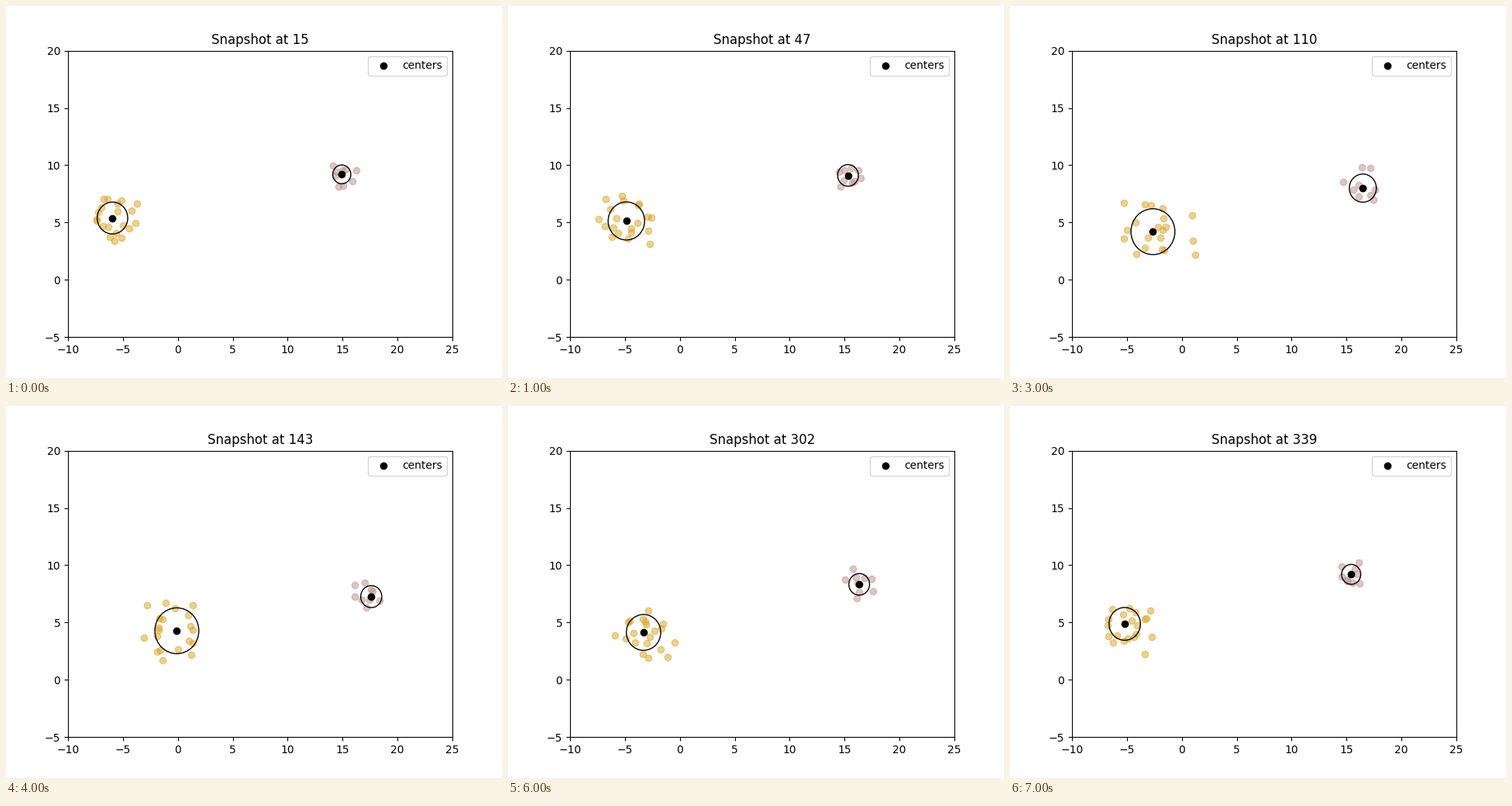
These frames come from a looping animation (640x480 px, 8 s). A matplotlib script:

```python
import numpy as np
import matplotlib.pyplot as plt
from matplotlib.animation import FuncAnimation
from matplotlib.patches import Circle

STEPS = [15, 47, 80, 110, 143, 262, 302, 339]
LIFE = 58  # steps a point stays in the sliding window
GOLDEN_ANGLE = np.pi * (3 - np.sqrt(5))

# Key points of each cluster's path: step -> x, y, radius.
GOLD_PATH = {15: (-5.95, 5.39, 1.39), 80: (-3.75, 4.87, 1.94), 110: (-2.63, 4.20, 2.0),
             143: (-0.09, 4.28, 2.0), 262: (-1.25, 3.33, 1.71), 339: (-5.20, 4.88, 1.43)}
PINK_PATH = {15: (14.93, 9.20, 0.82), 80: (15.71, 9.02, 1.07), 110: (16.48, 8.0, 1.23),
             143: (17.61, 7.26, 0.96), 262: (17.32, 7.39, 1.02), 339: (15.42, 9.20, 0.87)}


class Cloud:
    """A drifting cluster: points are born at a steady rate and drop out after LIFE steps."""

    def __init__(self, ax, color, path, count, seed):
        self.keys = list(path)
        self.values = np.array(list(path.values())).T
        self.dots = ax.scatter([], [], color=color, alpha=0.5)
        self.ring = ax.add_patch(Circle((0, 0), 1, fill=False))

        self.births = np.arange(STEPS[0] - LIFE, STEPS[-1] + 1, LIFE / count)
        x, y, radius = self.state(self.births + LIFE / 2)
        n = len(self.births)
        reach = radius * np.random.default_rng(seed).uniform(0.45, 1.45, n)
        angle = GOLDEN_ANGLE * np.arange(n)
        self.points = np.column_stack([x + reach * np.cos(angle),
                                       y + reach * np.sin(angle)])

    def state(self, step):
        return [np.interp(step, self.keys, v) for v in self.values]

    def show(self, step):
        alive = (self.births <= step) & (step < self.births + LIFE)
        self.dots.set_offsets(self.points[alive])
        x, y, radius = self.state(step)
        self.ring.set_center((x, y))
        self.ring.set_radius(radius)
        return x, y


fig, ax = plt.subplots(figsize=(6.4, 4.8), dpi=100)
ax.set_xlim(-10, 25)
ax.set_ylim(-5, 20)
title = ax.set_title("")

clouds = [Cloud(ax, "goldenrod", GOLD_PATH, count=20, seed=4),
          Cloud(ax, "rosybrown", PINK_PATH, count=9, seed=7)]
centers = ax.scatter([], [], color="black", label="centers", zorder=3)
ax.legend(loc="upper right")


def draw(i):
    step = STEPS[i]
    centers.set_offsets([cloud.show(step) for cloud in clouds])
    title.set_text(f"Snapshot at {step}")
    return centers, title


anim = FuncAnimation(fig, draw, frames=len(STEPS), interval=1000, repeat=True)
plt.show()
```
